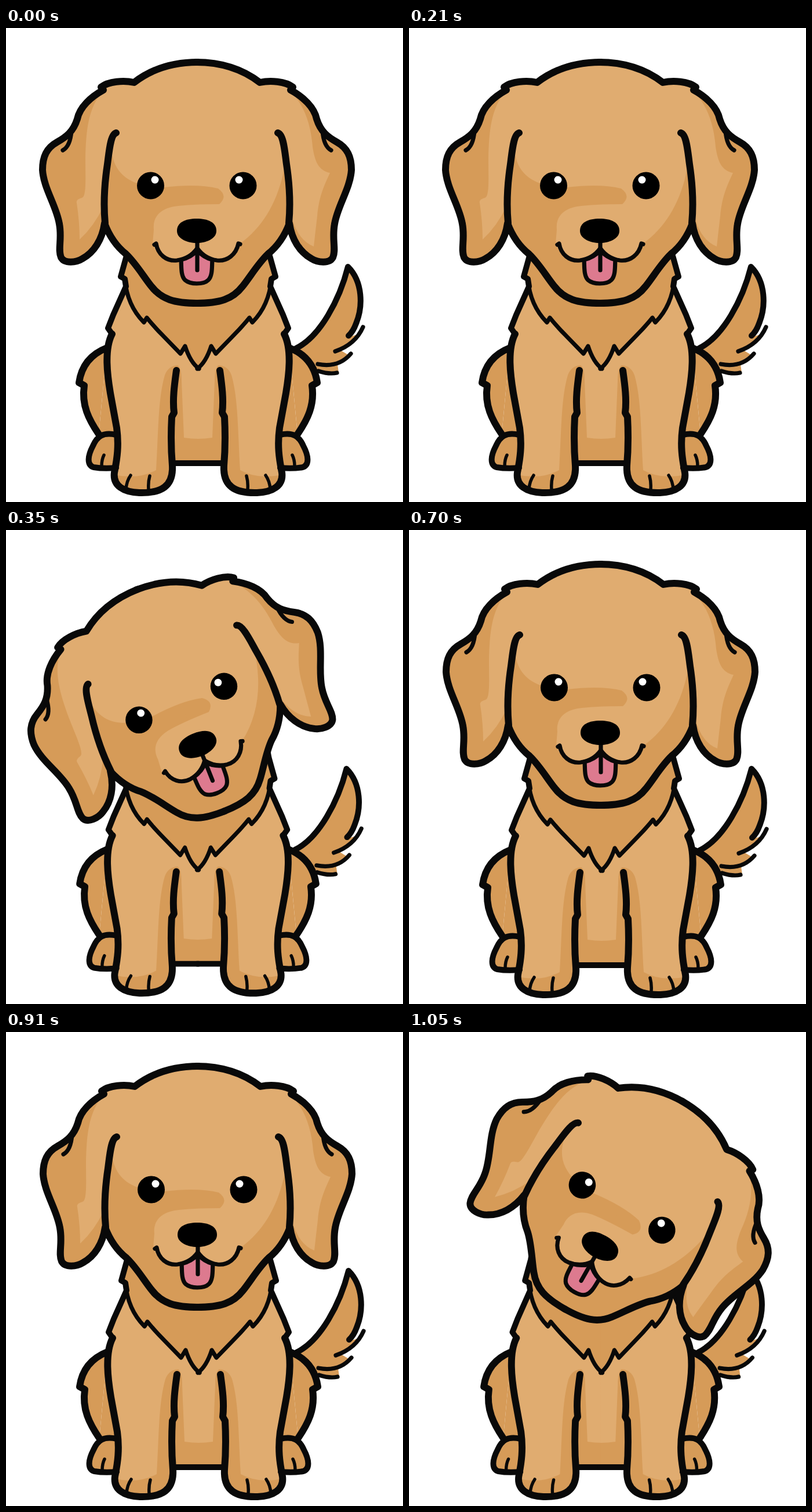
Write an HTML page that moves like this. It is 685 px wide and 818 px high and loops after 1400 ms.

```html
<!DOCTYPE html>
<html lang="en">
<head>
<meta charset="utf-8">
<title>Puppy tilting its head</title>
<style>
  html, body { margin: 0; width: 100%; height: 100%; overflow: hidden; background: #fff; }
  svg { display: block; width: 685px; height: 818px; }
  .dark { fill: #d69b58; }
  .light { fill: #e0ac70; }
  .line { fill: none; stroke: #090909; stroke-width: 12; stroke-linecap: round; stroke-linejoin: round; }
  .mid { stroke-width: 10; }
  .thin { stroke-width: 7.2; }
  .toe { stroke-width: 5.5; }
</style>
</head>
<body>
<svg viewBox="0 0 685 818">
  <defs>
    <!-- Left halves; the right sides are mirrored copies. -->
    <path id="skull" d="M331 59 C290 59 252 70 221 94 C203 90 177 92 164 102 L168 107
      C146 119 127 137 123 157 C116 179 104 188 88 197 C70 207 63 222 63 245
      C65 277 87 307 92 338 C97 364 89 382 95 396 C101 407 121 405 132 398
      C152 387 166 365 170 337 C179 361 192 378 207 390 C224 406 238 430 251 446
      C268 468 290 475 331 475"/>
    <g id="headLines">
      <use href="#skull"/>
      <path d="M190 181 C180 184 178 213 175 235 C170 268 168 305 171 337"/>
      <path class="thin" d="M113 177 Q111 204 98 211"/>
    </g>

    <path id="trunk" d="M333 375 H211 L198 429 L205 433 L207 446 L185 495 L176 518 L183 528
      C169 555 175 600 180 630 L191 690 C195 720 192 742 187 767 C184 790 203 802 230 802
      C268 803 289 792 288 755 V752 H333Z"/>
    <path id="haunch" d="M174 552 C146 563 130 584 126 612 L135 617 C130 651 143 676 160 701"/>
    <path id="foot" d="M190 702 C167 697 157 705 150 721 C141 738 139 754 151 758 Q168 761 190 759"/>
    <path id="coat" d="M333 588 L309 549 L301 562 L270 530 L243 500 L238 508 Q215 475 207 446
      L185 495 L176 518 L183 528 C169 555 175 600 180 630 L191 690 C195 720 192 742 187 771
      Q228 780 259 763 C263 700 262 640 274 599 Q280 583 296 582 Q303 586 303 610
      L307 707 Q320 709 333 709Z"/>
    <g id="trunkLines">
      <path class="mid" d="M211 377 L208 393 L198 429 L205 433 L207 446 L185 495 L176 518 L183 528"/>
      <path d="M183 528 C169 555 175 600 180 630 L191 690 C195 720 192 742 187 767
        C184 790 203 801 230 802 C268 803 289 791 287 755 C284 720 285 690 286 671 L290 664
        C287 640 291 613 294 591"/>
      <use href="#haunch"/>
      <use href="#foot" class="mid"/>
      <path class="mid" d="M289 751 H333"/>
      <path class="thin" d="M205 433 C208 467 222 492 238 508 L243 500 Q256 516 270 530 L301 562
        L309 549 Q318 577 333 588"/>
      <path class="toe" d="M215 772 Q208 782 207 796 M248 773 Q245 784 246 796 M169 737 Q165 745 165 756"/>
    </g>
  </defs>

  <g id="body">
    <path class="dark" d="M505 552 C545 527 573 470 590 412 C616 443 615 480 608 500
      L592 533 L610 528 Q595 549 577 556 L592 565 L572 580 L574 595 L535 596Z"/>
    <g class="line mid">
      <path d="M500 553 C542 533 576 468 590 412 C616 438 616 481 604 510 Q599 524 591 531"/>
      <path class="thin" d="M616 516 Q603 546 568 558 M595 562 Q574 587 538 580 M571 595 Q558 598 539 592"/>
    </g>
    <g class="dark">
      <g id="rump"><use href="#haunch"/><path d="M174 552 L160 701 H192Z"/><use href="#foot"/><use href="#trunk"/></g>
      <use href="#rump" transform="matrix(-1 0 0 1 663 0)"/>
    </g>
    <g class="light">
      <use href="#coat"/><use href="#coat" transform="matrix(-1 0 0 1 663 0)"/>
    </g>
    <g class="line">
      <use href="#trunkLines"/><use href="#trunkLines" transform="matrix(-1 0 0 1 663 0)"/>
    </g>
  </g>

  <g id="head">
    <g class="dark">
      <use href="#skull"/><use href="#skull" transform="matrix(-1 0 0 1 659 0)"/>
    </g>
    <path class="light" d="M330 59 C290 59 252 70 221 94 Q190 90 165 103 L168 108
      C141 137 138 180 137 225 C137 260 139 291 131 293 Q120 296 122 302 Q127 335 127 365
      Q152 342 168 308 L174 235 L181 205 C184 245 205 262 232 270 L272 275
      Q330 268 366 277 Q384 290 368 304 Q320 304 290 308 C262 313 253 330 255 348 L253 372
      C262 405 305 408 330 382 C355 408 395 405 404 372 C448 340 474 290 483 225
      L491 320 Q502 366 531 377 Q534 350 537 325 C540 290 549 272 559 250
      C540 246 533 232 529 205 C526 165 514 132 490 108 L496 101 Q470 90 438 94 C407 70 369 59 330 59Z"/>
    <g class="line">
      <use href="#headLines"/><use href="#headLines" transform="matrix(-1 0 0 1 659 0)"/>
      <path class="thin" fill="#dd7a8f" d="M302 400 C303 410 301 427 309 435
        Q316 441 329 441 Q343 441 349 435 C357 427 355 410 356 400 Q341 396 330 384 Q319 396 302 400Z"/>
      <path class="thin" d="M256 374 L259 372 C262 391 277 403 295 401 Q317 398 330 380
        Q343 398 364 401 C382 403 397 391 401 372 L404 373"/>
      <path class="thin" d="M330 366 V418"/>
    </g>
    <path d="M329 329 C348 329 363 335 363 350 C363 364 345 371 329 371 C313 371 295 364 295 350 C295 335 310 329 329 329Z"/>
    <circle cx="249.5" cy="272" r="23.5"/><circle cx="257" cy="262" r="6.5" fill="#fff"/>
    <circle cx="409" cy="272" r="23.5"/><circle cx="402" cy="262" r="6.5" fill="#fff"/>
  </g>
</svg>
<script>
  const STEP = 350;
  const body = document.getElementById('body');
  const head = document.getElementById('head');

  // Places the head by its left eye.
  const tilt = (x, y, angle, scale) =>
    `translate(${x} ${y}) rotate(${angle}) scale(${scale}) translate(-249 -272)`;
  const squash = (x, y, sx, sy) =>
    `translate(${x} ${y}) scale(${sx} ${sy}) translate(${-x} ${-y})`;

  const poses = [
    { head: '', body: '' },
    { head: tilt(229, 328, -21.6, .988), body: squash(270, 409, .992, .993) },
    { head: 'translate(1 0)', body: 'translate(1 0)' },
    { head: tilt(298.5, 264, 29.5, .99), body: squash(379, 409, .988, 1) }
  ];

  const start = performance.now();
  function draw() {
    const elapsed = performance.now() - start;
    const pose = poses[Math.floor(elapsed / STEP) % poses.length];
    head.setAttribute('transform', pose.head);
    body.setAttribute('transform', pose.body);
    requestAnimationFrame(draw);
  }
  draw();
</script>
</body>
</html>
```
